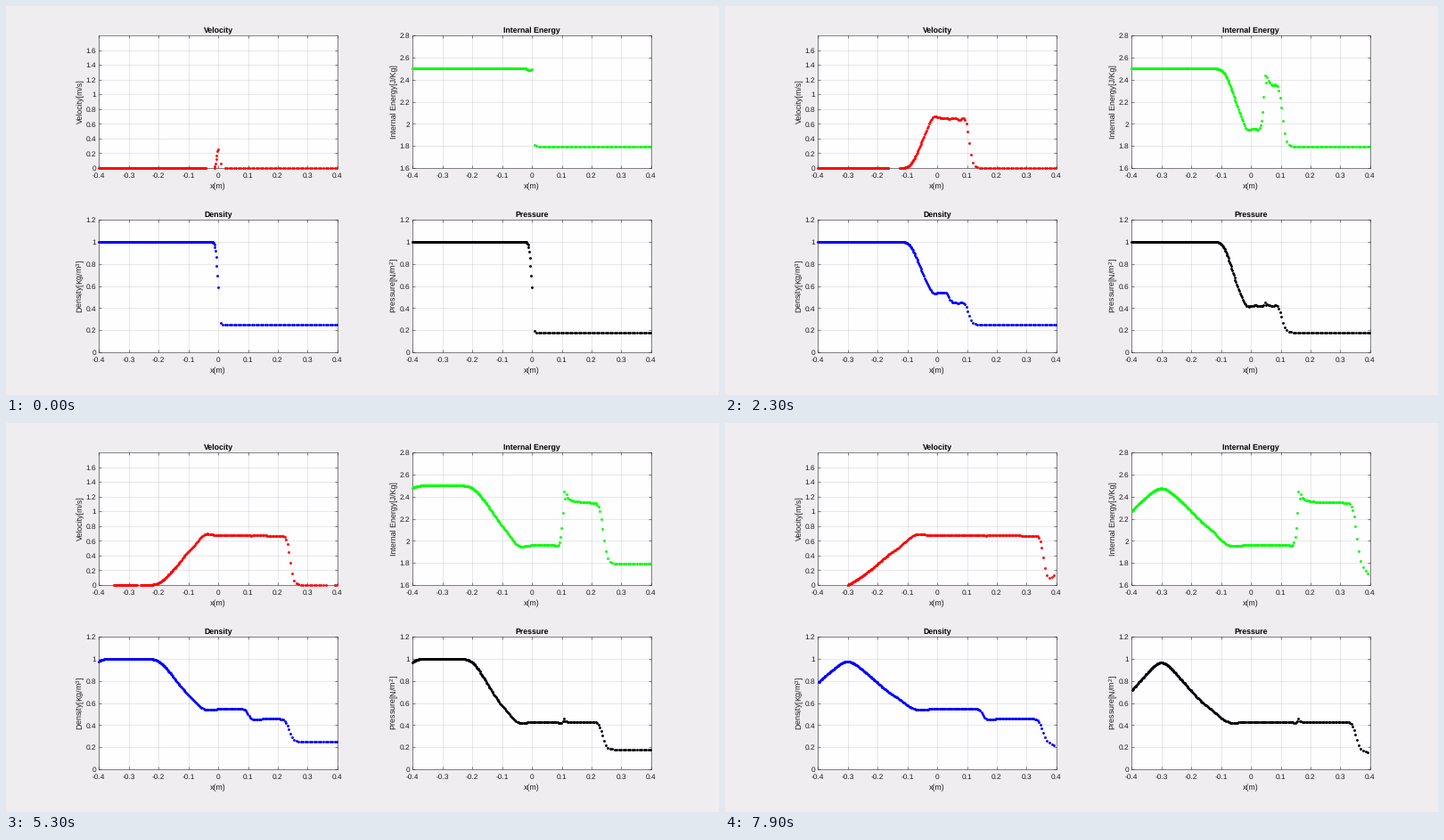
Animation of 800x437 px, one loop 8 s. Source, as a matplotlib script:

```python
import numpy as np
import matplotlib.pyplot as plt
from matplotlib.animation import FuncAnimation

W, H, DPI = 800, 437, 100
FRAMES, INTERVAL = 80, 100
PX = 72 / DPI

plt.rcParams.update({
    "font.family": "Liberation Sans",
    "mathtext.fontset": "custom",
    "mathtext.rm": "Liberation Sans",
    "mathtext.default": "regular",
    "text.hinting": "none",
})

# Shock tube solved with smoothed particles
GAMMA, MASS, SMOOTH, DT = 1.4, 0.001875, 0.01, 0.001
MIX = 0.02  # share of the neighbours' velocity taken over in each step
FIRST_STEP, STEPS_PER_FRAME = 2, 3


def kernel(q):
    """Cubic spline and its slope."""
    far = np.clip(2 - q, 0, None)
    w = np.where(q < 1, 2 / 3 - q**2 + q**3 / 2, far**3 / 6)
    slope = np.where(q < 1, -2 * q + 1.5 * q**2, -far**2 / 2)
    return w / SMOOTH, slope / SMOOTH**2


def rates(x, v, u):
    """Density, pressure, acceleration, heating and velocity mixing."""
    dx = x[:, None] - x
    dv = v[:, None] - v
    w, slope = kernel(np.abs(dx) / SMOOTH)

    rho = MASS * w.sum(1)
    p = (GAMMA - 1) * rho * u
    c = np.sqrt((GAMMA - 1) * u)
    mean_rho = (rho[:, None] + rho) / 2
    mu = SMOOTH * np.minimum(dv * dx, 0) / (dx**2 + 0.01 * SMOOTH**2)
    visc = (mu - (c[:, None] + c) / 2) * mu / mean_rho
    s = p / rho**2
    push = MASS * (s[:, None] + s + visc) * slope * np.sign(dx)
    mix = -MIX * MASS * (dv * w / mean_rho).sum(1)
    return rho, p, -push.sum(1), 0.5 * (push * dv).sum(1), mix


def simulate():
    gap = 0.0075
    x = np.r_[-0.6 + gap / 4 * np.arange(320), gap * np.arange(1, 81)]
    v = np.zeros_like(x)
    u = np.where(x < 0, 2.5, 1.795)
    acc, heat = rates(x, v, u)[2:4]
    states = []
    for step in range(1, FIRST_STEP + STEPS_PER_FRAME * (FRAMES - 1) + 1):
        x = x + DT * (v + DT / 2 * acc)
        rho, p, acc2, heat2, mix = rates(x, v + DT * acc, u + DT * heat)
        v = v + DT / 2 * (acc + acc2) + mix
        u = u + DT / 2 * (heat + heat2)
        acc, heat = acc2, heat2
        if step >= FIRST_STEP and (step - FIRST_STEP) % STEPS_PER_FRAME == 0:
            states.append((x, v, u, rho, p))
    return states


states = simulate()

fig = plt.figure(figsize=(W / DPI, H / DPI), dpi=DPI, facecolor="#efedf0")


def label(x, y, text, size, **kw):
    fig.text(x / W, 1 - y / H, text, fontsize=size * PX, color=kw.pop("color", "#1a1a1a"),
             ha=kw.pop("ha", "center"), va=kw.pop("va", "center_baseline"), **kw)


def panel(left, top, title, ylabel, color, ylim, yticks):
    width, height = 267.7, 149
    ax = fig.add_axes([left / W, 1 - (top + height) / H, width / W, height / H],
                      facecolor="#fefdff")
    ax.set(xlim=(-0.4, 0.4), ylim=ylim)
    xticks = np.linspace(-0.4, 0.4, 9)
    ax.set_xticks(xticks, [])
    ax.set_yticks(yticks, [])
    ax.tick_params(direction="in", length=2.7 * PX, width=0.55 * PX,
                   color="#262626", top=True, right=True)
    ax.grid(color="#262626", alpha=0.15, lw=0.65 * PX)
    ax.set_axisbelow(True)
    for spine in ax.spines.values():
        spine.set(linewidth=0.55 * PX, color="#262626")

    bottom = top + height
    for t in xticks:
        label(left + (t + 0.4) / 0.8 * width, bottom + 8.5, f"{round(t, 1) + 0:g}", 8.4)
    for t in yticks:
        y = bottom - (t - ylim[0]) / (ylim[1] - ylim[0]) * height
        label(left - 3.3, y + 0.3, f"{round(t, 1):g}", 8.4, ha="right")
    label(left + width / 2, top - 6.2, title, 8.8, weight="bold", color="black")
    label(left + width / 2, bottom + 19.5, "x(m)", 8.9)
    label(left - 18, top + height / 2, ylabel, 8.9, rotation=90,
          rotation_mode="anchor", va="baseline")
    return ax.plot([], [], "o", ms=2.9 * PX, mew=0, color=color,
                   clip_on=False, snap=False, zorder=3)[0]


unit = np.arange(0, 1.3, 0.2)
velocity = panel(104.2, 33, "Velocity", "Velocity[m/s]", "#ff0000",
                 (0, 1.8), np.arange(0, 1.7, 0.2))
energy = panel(456.2, 33, "Internal Energy", "Internal Energy[J/Kg]", "#00ff00",
               (1.6, 2.8), np.linspace(1.6, 2.8, 7))
density = panel(104.2, 240, "Density", "Density[Kg/m$^3$]", "#0000ff", (0, 1.2), unit)
pressure = panel(456.2, 240, "Pressure", "Pressure[N/m$^2$]", "#000000", (0, 1.2), unit)


def draw(n):
    x, v, u, rho, p = states[n]
    inside = np.abs(x) <= 0.4
    for dots, y in ((velocity, v), (energy, u), (density, rho), (pressure, p)):
        keep = inside & (y > -2e-5)
        dots.set_data(x[keep], y[keep])
    return velocity, energy, density, pressure


anim = FuncAnimation(fig, draw, frames=FRAMES, interval=INTERVAL, repeat=True)
plt.show()
```
